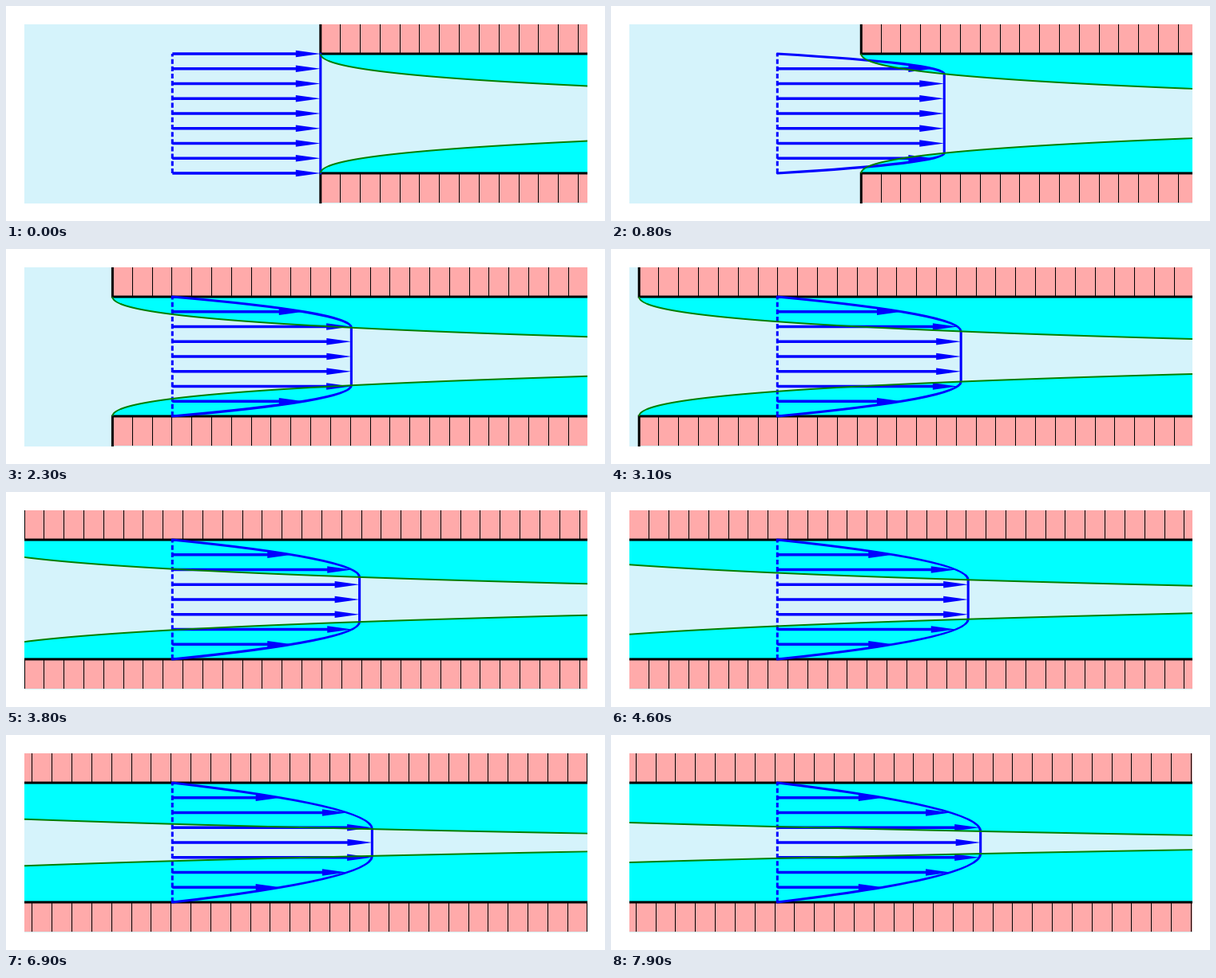
Animation of 750 by 270 pixels, one loop 8 s. Source, as an HTML page with a canvas:

```html
<!DOCTYPE html>
<html lang="en">
<head>
<meta charset="utf-8">
<title>Developing channel flow</title>
<style>
html, body { margin: 0; width: 750px; height: 270px; overflow: hidden; background: #fff; }
canvas { display: block; }
</style>
</head>
<body>
<canvas id="stage" width="750" height="270"></canvas>
<script>
const c = document.getElementById('stage').getContext('2d');
const LEFT = 23, RIGHT = 728, TOP = 23, BOTTOM = 248;
const WALL = 60, FLOOR = 210, HALF = 75, MID = 135;
const BASE = 208.3;        // where the arrows start
const INLET = 185.5;       // arrow length at the inlet
const ENTRY = 1852;        // length scale of the boundary layer
const HATCH = 24.82;
const STEP = 13, FRAMES = 80, FRAME_MS = 100;

// Distance from the inlet at which the layer fills the fraction e of the half height
const distance = e => ENTRY * (81 / (3 - e) + 48 * Math.log(1 - e / 3) + 7 * e - 27);

function layerAt(d) {
  if (d <= 0) return 0;
  let lo = 0, hi = 1;
  for (let i = 0; i < 40; i++) {
    const m = (lo + hi) / 2;
    if (distance(m) < d) lo = m; else hi = m;
  }
  return lo;
}

function rect(x, y, w, h, color) {
  c.fillStyle = color;
  c.fillRect(x, y, w, h);
}

function stroke(color, width) {
  c.strokeStyle = color;
  c.lineWidth = width;
  c.stroke();
}

// Edge of the boundary layer; side is -1 for the upper wall, 1 for the lower
function layerPath(inlet, side) {
  c.beginPath();
  for (let i = 0; i <= 100; i++) {
    const e = i / 100;
    c.lineTo(inlet + distance(e), MID + side * HALF * (1 - e));
  }
}

function drawWall(inlet, y, edge) {
  const h = WALL - TOP;
  rect(inlet, y, RIGHT - inlet, h, '#faa');
  for (let x = inlet + HATCH; x < RIGHT; x += HATCH) rect(Math.floor(x), y, 1, h, '#000');
  c.beginPath();
  c.moveTo(inlet, y === TOP ? TOP : BOTTOM);
  c.lineTo(inlet, edge);
  c.lineTo(RIGHT, edge);
  stroke('#000', 3);
}

function drawArrow(y, length) {
  const tip = BASE + length, back = tip - 31;
  c.beginPath();
  c.moveTo(BASE, y);
  c.lineTo(Math.max(BASE, back + 4), y);
  stroke('#00f', 3.5);
  c.beginPath();
  c.moveTo(back, y - 4.2);
  c.lineTo(tip, y);
  c.lineTo(back, y + 4.2);
  c.fillStyle = '#00f';
  c.fill();
}

function drawProfile(e, speed) {
  c.beginPath();
  c.setLineDash([6.1, 3.05]);
  c.moveTo(BASE, FLOOR);
  c.lineTo(BASE, WALL);
  stroke('#00f', 3);
  c.setLineDash([]);

  for (let i = 0; i <= 8; i++) {
    const y = WALL + i * HALF / 4;
    const depth = 1 - Math.abs(y - MID) / HALF;
    const s = e > 0 ? Math.min(1, depth / e) : 1;
    if (s > 0) drawArrow(y, speed * s * (2 - s));
  }

  const tip = BASE + speed, delta = e * HALF;
  c.beginPath();
  if (e > 0) {
    c.moveTo(BASE, WALL);
    c.quadraticCurveTo(tip, WALL + delta / 2, tip, WALL + delta);
    c.lineTo(tip, FLOOR - delta);
    c.quadraticCurveTo(tip, FLOOR - delta / 2, BASE, FLOOR);
  } else {
    c.moveTo(tip, WALL);
    c.lineTo(tip, FLOOR);
  }
  c.lineCap = 'round';
  stroke('#00f', 3.1);
  c.lineCap = 'butt';
}

function draw(now) {
  const d = STEP * (Math.floor(now / FRAME_MS) % FRAMES);
  const e = layerAt(d);
  const speed = INLET / (1 - e / 3);   // core speed from mass conservation
  const inlet = BASE + speed - d;

  c.clearRect(0, 0, 750, 270);
  c.save();
  c.beginPath();
  c.rect(LEFT, TOP, RIGHT - LEFT, BOTTOM - TOP);
  c.clip();
  rect(LEFT, TOP, RIGHT - LEFT, BOTTOM - TOP, '#d5f3fb');

  for (const side of [-1, 1]) {
    layerPath(inlet, side);
    c.lineTo(inlet + distance(1), MID + side * HALF);
    c.fillStyle = '#0ff';
    c.fill();
  }
  drawWall(inlet, TOP, WALL);
  drawWall(inlet, FLOOR, FLOOR);
  drawProfile(e, speed);
  for (const side of [-1, 1]) {
    layerPath(inlet, side);
    stroke('#008000', 1.9);
  }
  c.restore();
}

const start = performance.now();
function tick() {
  draw(performance.now() - start);
  requestAnimationFrame(tick);
}
tick();
</script>
</body>
</html>
```
